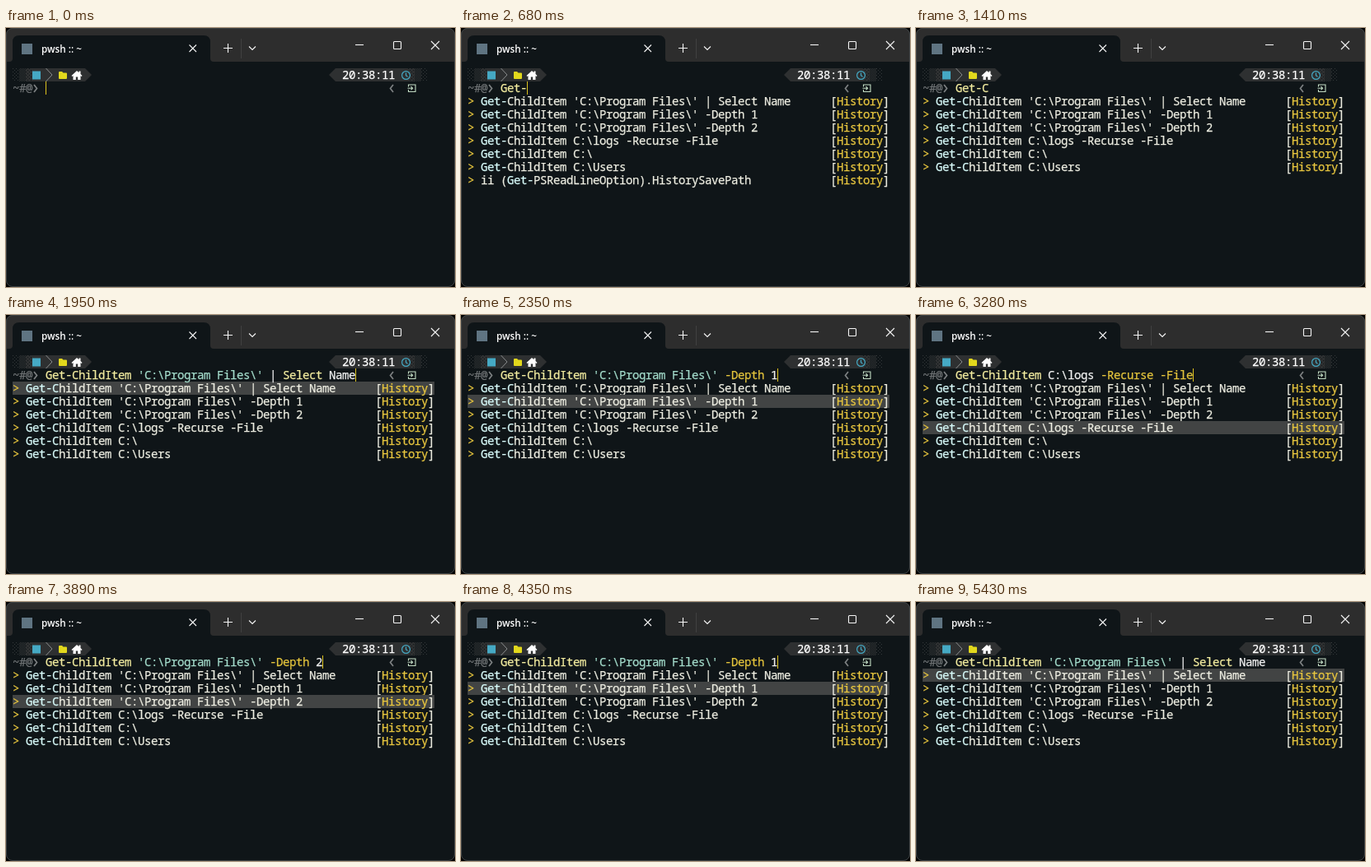
Recreate the animation shown at these times as an HTML page. Size 545 px wide and 315 px high, loop 5770 ms.

```html
<!DOCTYPE html>
<html lang="en">
<head>
<meta charset="utf-8">
<title>Terminal history list</title>
<style>
  html, body { margin: 0; width: 100%; height: 100%; overflow: hidden; background: #000; }
  svg { display: block; width: 545px; height: 315px; }
  text { white-space: pre; fill: currentColor; }
  .mono { font: 500 14px "Noto Sans Mono", "DejaVu Sans Mono", monospace; letter-spacing: -.4px; }
  .mono, .mono text { stroke: currentColor; stroke-width: .25px; }
  .tab { font: 600 11.7px "Open Sans", "Noto Sans", sans-serif; }
  .thin { fill: none; stroke: #f4f4f4; stroke-width: 1.1; }
</style>
</head>
<body>
<svg viewBox="0 0 545 315">
  <defs>
    <pattern id="light" width="4" height="4" patternUnits="userSpaceOnUse">
      <path d="M0 1h1v1h-1zM2 3h1v1h-1z" fill="#34383a"/>
    </pattern>
    <pattern id="mid" width="2" height="2" patternUnits="userSpaceOnUse">
      <path d="M0 0h1v1h-1zM1 1h1v1h-1z" fill="#303334"/>
    </pattern>
    <pattern id="dense" width="4" height="4" patternUnits="userSpaceOnUse">
      <path d="M0 0h4v4h-4z" fill="#2e3031"/>
      <path d="M0 1h1v1h-1zM2 3h1v1h-1z" fill="#0f1518"/>
    </pattern>
    <clipPath id="frame"><rect width="545" height="315" rx="8"/></clipPath>
  </defs>

  <g clip-path="url(#frame)">
    <rect width="545" height="315" fill="#0f1518"/>
    <rect width="545" height="41" fill="#2d2d2d"/>
    <path d="M4 41q4 0 4-4V17q0-8 8-8H240q8 0 8 8V37q0 4 4 4z" fill="#0f1518"/>
  </g>
  <rect x=".5" y=".5" width="544" height="314" rx="7.5" fill="none" stroke="#3c4042"/>

  <rect x="19" y="19" width="13" height="13" fill="#5f7482"/>
  <text class="tab" x="43" y="30" color="#fff">pwsh :: ~</text>
  <g class="thin">
    <path d="M222.5 20.5l8.5 8.5M231 20.5l-8.500 8.500"/>
    <path d="M264 24.5h11M269.5 19v11"/>
    <path d="M295 22.500l4 4 4-4"/>
    <path d="M424 20.5h10"/>
    <rect x="470.5" y="16.5" width="9" height="9" rx="1"/>
    <path d="M516 16l10 10M526 16l-10 10"/>
  </g>
  <path d="M285.5 13v24" stroke="#414141"/>

  <!-- left status segment -->
  <rect x="8" y="49" width="8" height="16" fill="url(#light)"/>
  <rect x="16" y="49" width="8" height="16" fill="url(#mid)"/>
  <rect x="24" y="49" width="8" height="16" fill="url(#dense)"/>
  <path d="M32 49H96l8 8-8 8H32z" fill="#2e3031"/>
  <rect x="32" y="52.5" width="10" height="10" fill="#45a9c4"/>
  <path d="M48.5 49l7.5 8-7.5 8" fill="none" stroke="#8a8d8e"/>
  <path d="M64 54q0-1 1-1h3l1.5 1.5H73q1 0 1 1V61q0 1-1 1H65q-1 0-1-1z" fill="#e2d81c"/>
  <path d="M79.5 58l6.5-6 2.5 2.300V52.5h2v3.600l2 1.900-1 1-1-.9V63h-3.300v-3.500h-2.400V63h-3.300v-4.900l-1 .9z" fill="#fff"/>

  <!-- right status segment -->
  <path d="M488 49H400l-8 8 8 8H488z" fill="#2e3031"/>
  <rect x="488" y="49" width="8" height="16" fill="url(#dense)"/>
  <rect x="496" y="49" width="8" height="16" fill="url(#mid)"/>
  <rect x="504" y="49" width="8" height="16" fill="url(#light)"/>
  <text class="mono" x="408" y="62" color="#fff">20:38:11</text>
  <g fill="none" stroke="#45a9c4" stroke-width="1.2">
    <circle cx="485.5" cy="57.5" r="4.9"/>
    <path d="M485.5 54.5v3.2l2 1.5"/>
  </g>

  <!-- prompt row -->
  <text class="mono" x="8" y="78" color="#6f7375">~#@</text>
  <g fill="none" stroke="#7d8182" stroke-width="1.7">
    <path d="M34 69l3.5 4.5-3.5 4.5"/>
    <path d="M470 69l-3.5 4.5 3.5 4.5"/>
  </g>
  <g fill="none" stroke="#c3dcc4" stroke-width="1.1">
    <path d="M488.5 71.5v-2.500h8.500v8.500h-8.500v-2.500"/>
    <path d="M487.5 73.3h6M491.500 71.200l2.100 2.100-2.100 2.100"/>
  </g>

  <g id="list" class="mono"></g>
  <g id="line" class="mono"></g>
</svg>

<script>
const LOOP = 5770, CELL = 8, LEFT = 8, TOP = 65;
const palette = {
  text: '#eeeee2', command: '#f4eda0', string: '#a3dccb', param: '#e4c43c',
  match: '#d8fbfa', gold: '#e8c63f', white: '#f2f2f2', cursor: '#dcc31e', select: '#424444'
};

const history = [
  "Get-ChildItem 'C:\\Program Files\\' | Select Name",
  "Get-ChildItem 'C:\\Program Files\\' -Depth 1",
  "Get-ChildItem 'C:\\Program Files\\' -Depth 2",
  "Get-ChildItem C:\\logs -Recurse -File",
  "Get-ChildItem C:\\",
  "Get-ChildItem C:\\Users",
  "ii (Get-PSReadLineOption).HistorySavePath"
];

// time, typed query, entry on the input line, selected row, cursor shown
const steps = [
  [0, '', -1, -1, 1],
  [210, 'G', -1, -1, 1],
  [410, 'Ge', -1, -1, 1],
  [540, 'Get', -1, -1, 1],
  [680, 'Get-', -1, -1, 1],
  [810, 'Get-C', -1, -1, 1],
  [1410, 'Get-C', -1, -1, 0],
  [1950, 'Get-C', 0, 0, 1],
  [2350, 'Get-C', 1, 1, 1],
  [2750, 'Get-C', 2, 1, 1],
  [2810, 'Get-C', 2, 2, 1],
  [3220, 'Get-C', 3, 2, 1],
  [3280, 'Get-C', 3, 3, 1],
  [3890, 'Get-C', 2, 2, 1],
  [4290, 'Get-C', 1, 2, 1],
  [4350, 'Get-C', 1, 1, 1],
  [4760, 'Get-C', 0, 1, 1],
  [4820, 'Get-C', 0, 0, 1],
  [5430, 'Get-C', 0, 0, 0]
];

const list = document.getElementById('list');
const line = document.getElementById('line');

function add(parent, tag, attrs, content = '') {
  const el = document.createElementNS('http://www.w3.org/2000/svg', tag);
  for (const key in attrs) el.setAttribute(key, attrs[key]);
  el.textContent = content;
  parent.append(el);
}

function bar(parent, col, row, width, fill) {
  add(parent, 'rect', { x: LEFT + col * CELL, y: TOP + row * 16, width, height: 16, fill, stroke: 'none', style: 'stroke: none' });
}

// Each word is placed on the character grid.
function write(parent, str, col, row, color) {
  for (const m of str.matchAll(/\S+/g)) {
    add(parent, 'text', { x: LEFT + (col + m.index) * CELL, y: TOP + row * 16 + 13, color }, m[0]);
  }
}

function drawLine(str, cursor) {
  line.replaceChildren();
  let command = true;
  for (const m of str.matchAll(/'[^']*'|\S+/g)) {
    const word = m[0];
    const kind = command ? 'command' : word[0] === "'" ? 'string' : word[0] === '-' ? 'param' : 'white';
    write(line, word, 5 + m.index, 0, palette[kind]);
    command = word === '|';
  }
  if (cursor) bar(line, 5 + str.length, 0, 1, palette.cursor);
}

function drawList(query, selected) {
  list.replaceChildren();
  if (!query) return;
  history.filter(entry => entry.includes(query)).forEach((entry, i) => {
    const row = i + 1, at = entry.indexOf(query), end = at + query.length;
    if (i === selected) bar(list, 0, row, 512, palette.select);
    write(list, '>', 0, row, palette.gold);
    write(list, entry.slice(0, at), 2, row, palette.text);
    write(list, query, 2 + at, row, palette.match);
    write(list, entry.slice(end), 2 + end, row, palette.text);
    write(list, '[', 55, row, palette.text);
    write(list, 'History', 56, row, palette.gold);
    write(list, ']', 63, row, palette.text);
  });
}

let shown = null;
function tick() {
  const t = performance.now() % LOOP;
  const step = steps.findLast(s => s[0] <= t);
  if (step !== shown) {
    const [, query, entry, selected, cursor] = shown = step;
    drawLine(entry < 0 ? query : history[entry], cursor);
    drawList(query, selected);
  }
  requestAnimationFrame(tick);
}
tick();
</script>
</body>
</html>
```
